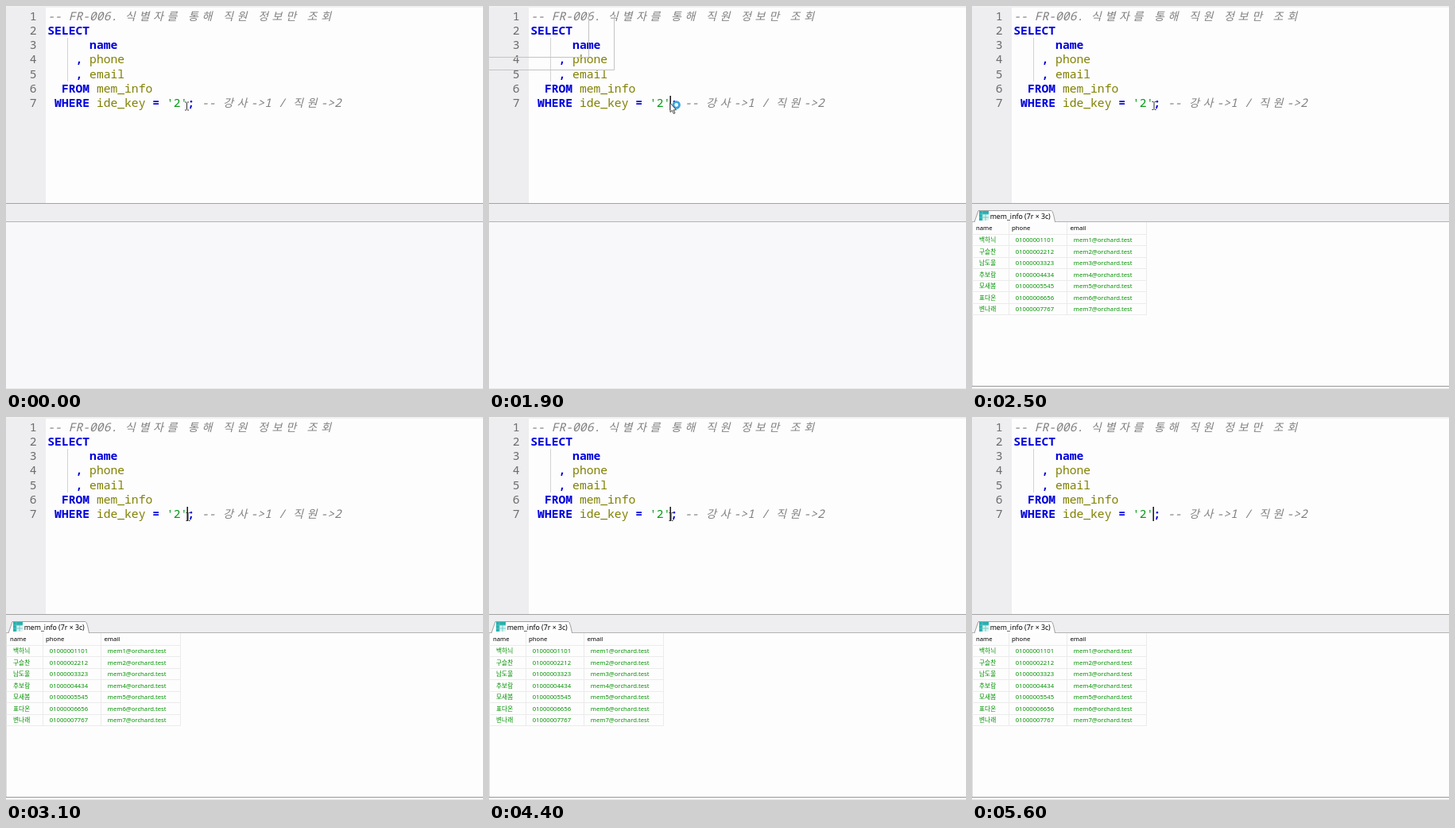
An HTML page for the animation above (5700 ms loop, 600x482 px).

```html
<!DOCTYPE html>
<html lang="ko">
<head>
<meta charset="utf-8">
<style>
html, body { margin: 0; width: 100%; height: 100%; overflow: hidden; background: #fdfdfe; }
svg { display: block; }
text { white-space: pre; }
.code { font: 14.667px "Noto Sans Mono", "Noto Sans CJK KR", "Noto Sans CJK", monospace; }
.ko { font: 14px "Noto Sans CJK KR", "Noto Sans CJK", sans-serif; }
.key { fill: #0000dc; font-weight: bold; }
.id { fill: #808000; }
.str { fill: #009a10; }
.note { fill: #808080; font-style: italic; }
.num { fill: #6c6c6c; }
.ui { font: 7.7px "Noto Sans", "Noto Sans CJK KR", "Noto Sans CJK", sans-serif; }
.cell { fill: #009200; }
</style>
</head>
<body>
<svg width="600" height="482" viewBox="0 0 600 482">
  <rect width="600" height="482" fill="#fdfdfe"/>
  <rect width="600" height="2" fill="#f0f0f1"/>
  <rect y="2" width="50" height="246" fill="#eeedef"/>
  <path d="M77.5 40V95" stroke="#d2d2d2"/>
  <rect y="248" width="600" height="24" fill="#eeedef"/>
  <path d="M0 248.5H600" stroke="#a4a4a4"/>
  <path d="M0 271.5H600" stroke="#b4b4b4"/>
  <rect y="272" width="600" height="209" fill="#f8f7f9"/>
  <path d="M0 481.5H600" stroke="#e9e9ea"/>
  <g id="code"></g>

  <g id="result">
    <rect y="272" width="600" height="206" fill="#fefdfe"/>
    <path d="M0 478.5H600" stroke="#999"/>
    <path d="M0.5 272V478" stroke="#ddd"/>
    <path d="M3 272L8 257.5H100Q102 258 104.500 272" fill="#fefefe" stroke="#a0a0a0"/>
    <rect x="9" y="258" width="12" height="12" fill="#25b0b0"/>
    <path d="M13 262h8v8h-8z" fill="#d8f3f1"/>
    <path d="M9 262H21M9 266H21M13 258V270M17 262V270" stroke="#62c5c2" stroke-width=".8"/>
    <g id="grid"></g>
  </g>

  <path id="ghost" d="M0 64.500H125.500V8M0 80.500H157.500V8" fill="none" stroke="#c4c4c4"/>
  <path id="caret" d="M228.200 113V131" stroke="#111" stroke-width="1.500"/>
  <path id="beam" d="M-2.500 -5H-.7M.7 -5H2.500M0 -4.500V4.500M-2.500 5H-.7M.7 5H2.500" stroke="#2c2c2c" fill="none"/>
  <g id="busy">
    <circle cx="235.700" cy="124.500" r="3.800" fill="#e9f7ff" stroke="#3da2dc" stroke-width="2.800"/>
    <path d="M228 122V133.500L230.500 131.300L232.300 135.500L234 134.700L232.200 130.800H235.500Z" fill="#fff" stroke="#333" stroke-width=".9"/>
  </g>
</svg>
<script>
const $ = id => document.getElementById(id);

function label(parent, x, y, str, cls) {
  const el = document.createElementNS("http://www.w3.org/2000/svg", "text");
  el.setAttribute("x", x);
  el.setAttribute("y", y);
  el.setAttribute("class", cls);
  el.textContent = str;
  parent.append(el);
}

// Hangul takes two columns of the editor's character grid
const CELL = 8.8, LEFT = 52.3;
const baseline = row => Math.round(17.8 + 18.2 * row);
function code(row, col, str, cls) {
  for (const part of str.match(/[가-힣]|[^가-힣]+/g)) {
    const ko = /[가-힣]/.test(part);
    const x = LEFT + col * CELL + (ko ? 0.7 : 0);
    label($("code"), x, baseline(row), part, (ko ? "ko " : "code ") + cls);
    col += ko ? 2 : part.length;
  }
}

for (let i = 0; i < 7; i++) label($("code"), 29.7, baseline(i), i + 1, "code num");
code(0, 0, "-- FR-006. 식별자를 통해 직원 정보만 조회", "note");
code(1, 0, "SELECT", "key");
code(2, 6, "name", "key");
code(3, 4, ",", "key");
code(3, 6, "phone", "id");
code(4, 4, ",", "key");
code(4, 6, "email", "id");
code(5, 2, "FROM", "key");
code(5, 7, "mem_info", "id");
code(6, 1, "WHERE", "key");
code(6, 7, "ide_key", "id");
code(6, 15, "=", "key");
code(6, 17, "'2'", "str");
code(6, 20, ";", "key");
code(6, 22, "-- 강사->1 / 직원->2", "note");

const grid = $("grid"), ROW = 14.45;
const people = ["백하늬", "구슬찬", "남도울", "추보람", "모새봄", "표다온", "변나래"];
let lines = "M46.5 272V388.500M119.500 272V388.500M219.500 272V388.500";
for (let i = 0; i <= 7; i++) lines += `M0 ${Math.round(287 + i * ROW) + .5}H219.5`;
grid.innerHTML = `<path d="${lines}" stroke="#ebebec"/>`;
label(grid, 22.7, 268, "mem_info (7r × 3c)", "ui");
grid.lastChild.style.fontSize = "8.75px";
label(grid, 5, 282, "name", "ui");
label(grid, 50, 282, "phone", "ui");
label(grid, 123.5, 282, "email", "ui");
people.forEach((name, i) => {
  const y = 297.3 + i * ROW;
  label(grid, 9, y, name, "ui cell");
  label(grid, 54.7, y, "0100000" + (1101 + i * 1111), "ui cell");
  label(grid, 127.7, y, `mem${i + 1}@orchard.test`, "ui cell");
});

// Pointer path: time, x, y
const path = [[0, 227.5, 126], [600, 229, 125.5], [4500, 229, 125.5], [4800, 429, 100], [5300, 429, -8], [5700, 429, -8]];
function pointer(t) {
  const i = path.findIndex(p => p[0] > t), a = path[i - 1], b = path[i];
  const k = (t - a[0]) / (b[0] - a[0]);
  return [a[1] + (b[1] - a[1]) * k, a[2] + (b[2] - a[2]) * k];
}

const show = (id, on) => $(id).style.display = on ? "" : "none";
const RUN = 1900, DONE = 2000, BLINK = 1060;

function draw(now) {
  const t = Math.floor(now % 5700 / 100) * 100;
  const running = t >= RUN && t < DONE;
  const phase = t < RUN ? (t + BLINK - 410) % BLINK : (t - RUN + 2) % BLINK;
  show("caret", phase < 530);
  show("ghost", running);
  show("busy", running);
  show("beam", !running);
  show("result", t >= DONE);
  $("beam").setAttribute("transform", `translate(${pointer(t)})`);
}

const start = performance.now();
function tick() {
  draw(performance.now() - start);
  requestAnimationFrame(tick);
}
tick();
</script>
</body>
</html>
```
